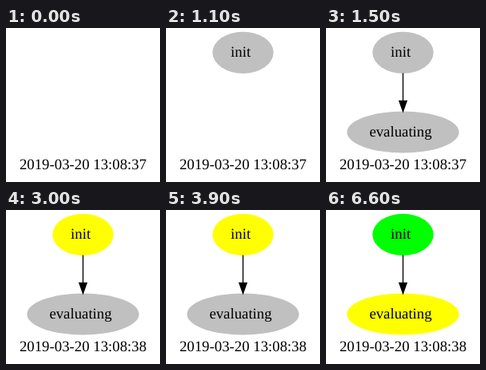
An HTML page for the animation above (8 s loop, 193 by 193 pixels).

```html
<!DOCTYPE html>
<html lang="en">
<head>
<meta charset="utf-8">
<title>Task graph</title>
<style>
  html, body { margin: 0; width: 100%; height: 100%; overflow: hidden; background: #fff; }
  svg { display: block; width: 100vw; height: 100vh; }
  text {
    font: 18.8px "Liberation Serif", "Times New Roman", serif;
    text-anchor: middle;
    text-rendering: geometricPrecision;
  }
  ellipse { fill: #c0c0c0; }

  /* every state change is a hard cut on one shared 8 s clock */
  .init, .eval, .init ellipse, .eval ellipse, .before, .after {
    animation: 8s step-end infinite;
  }
  .init { animation-name: show-init; }
  .eval { animation-name: show-eval; }
  .init ellipse { animation-name: init-state; }
  .eval ellipse { animation-name: eval-state; }
  .before { animation-name: before; }
  .after { animation-name: after; }

  @keyframes show-init { 0% { visibility: hidden; } 6.25%, 100% { visibility: visible; } }
  @keyframes show-eval { 0% { visibility: hidden; } 18.75%, 100% { visibility: visible; } }
  @keyframes init-state {
    0% { fill: #c0c0c0; }
    37.5% { fill: #ff0; }
    56.25%, 100% { fill: #0f0; }
  }
  @keyframes eval-state { 0% { fill: #c0c0c0; } 56.25%, 100% { fill: #ff0; } }
  @keyframes before { 0% { visibility: visible; } 25%, 100% { visibility: hidden; } }
  @keyframes after { 0% { visibility: hidden; } 25%, 100% { visibility: visible; } }
</style>
</head>
<body>
<svg viewBox="0 0 193 193">
  <g class="init">
    <ellipse cx="96.5" cy="30.8" rx="38.2" ry="26.1"/>
    <text x="93.6" y="36.2">init</text>
  </g>
  <g class="eval">
    <ellipse cx="96.5" cy="130.5" rx="70.2" ry="26.1"/>
    <text x="93.5" y="136">evaluating</text>
    <path d="M96.5 56.6V91.5" stroke="#000" stroke-width="1.33"/>
    <path d="M91.83 91.3H101.17L96.5 104.6Z" stroke="#000" stroke-width="1.33"/>
  </g>
  <text class="before" x="96.5" y="176.7">2019-03-20 13:08:37</text>
  <text class="after" x="96.5" y="176.7">2019-03-20 13:08:38</text>
</svg>
</body>
</html>
```
